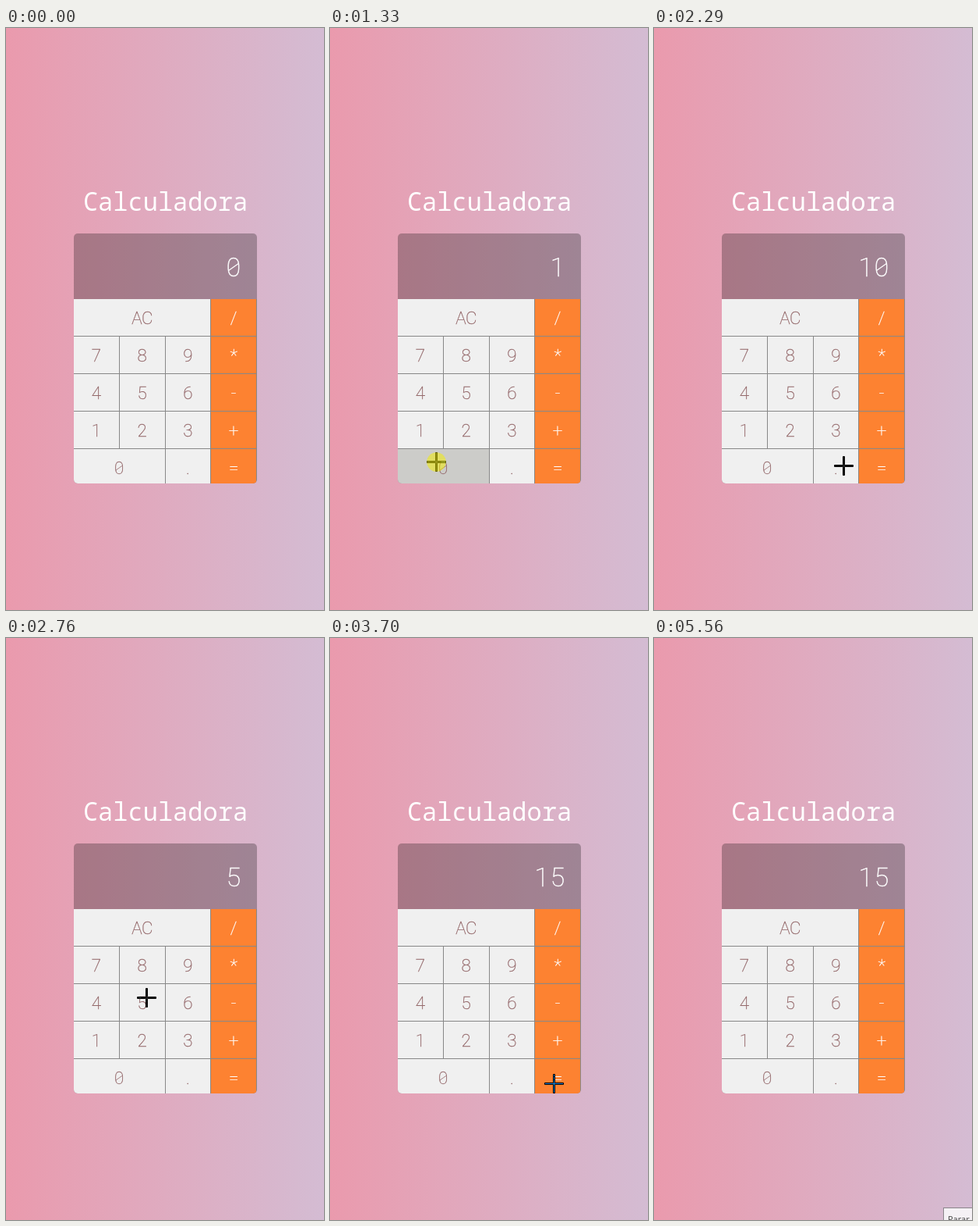
Recreate the animation shown at these times as an HTML page. Size 408 px wide and 745 px high, loop 5.64 s.

```html
<!DOCTYPE html>
<html lang="pt">
<head>
<meta charset="utf-8">
<title>Calculadora</title>
<style>
  html, body { margin: 0; width: 100%; height: 100%; overflow: hidden; }
  svg { display: block; width: 408px; height: 745px; }
  text { text-anchor: middle; }
  .title { font: 400 32px "Roboto Mono", "Noto Sans Mono", monospace; fill: #fff; }
  .glyph { font-family: Roboto, sans-serif; font-weight: 100; }
  .tip { font: 11px "Open Sans", sans-serif; fill: #444; text-anchor: start; }
  .invert { mix-blend-mode: difference; }
</style>
</head>
<body>
<svg viewBox="0 0 408 745">
  <defs>
    <linearGradient id="sky">
      <stop offset="0" stop-color="#ea9aad"/>
      <stop offset="1" stop-color="#d4bcd3"/>
    </linearGradient>
    <clipPath id="body"><rect x="87" y="263" width="235" height="320" rx="5"/></clipPath>
  </defs>
  <rect width="408" height="745" fill="url(#sky)"/>
  <text class="title" x="204.5" y="233.5">Calculadora</text>
  <g id="calculator" clip-path="url(#body)">
    <rect x="87" y="263" width="235" height="84" fill="#000" fill-opacity=".267"/>
  </g>
  <g id="display"></g>
  <path class="pointer" fill="none" stroke="#000"
        d="M-1-12H1V-1H12V1H1V12H-1V1H-12V-1H-1Z"/>
  <path class="pointer invert" fill="none" stroke="#fff" d="M0-11.5V11.5M-11.5 0H11.5"/>
  <circle id="halo" class="pointer" r="12.3" fill="#f4ee00" fill-opacity=".52"/>
  <g id="tooltip">
    <rect x="371.5" y="729.5" width="50" height="30" fill="#f5f1f5" stroke="#8a858a"/>
    <text class="tip" x="377" y="748">Parar</text>
  </g>
</svg>
<script>
const LOOP = 5640;
const BEAT = 78.6;      // the picture is refreshed once per beat
const EARLY = 20;
const COLUMN = 58.75, ROW = 48;
const KEY_ROWS = ["AC /", "7 8 9 *", "4 5 6 -", "1 2 3 +", "0 . ="];
const SPANS = { AC: 3, 0: 2 };
const CLICKS = [["1", 12], ["0", 17], ["+", 25], ["5", 34], ["=", 46]];

// Pointer strokes: beats, end point and the control point that bends them.
const ENTRY = [337, 740];
const STROKES = [
  { from: 1, until: 11, to: [118, 516], via: [175, 566] },
  { from: 13, until: 17, to: [136, 555] },
  { from: 18, until: 24, to: [289, 517], via: [212, 558] },
  { from: 26, until: 33, to: [180, 460], via: [236, 626] },
  { from: 35, until: 43, to: [287, 570], via: [276, 654] },
  { from: 48, until: 53, to: [283, 640] },
  { from: 60, until: 66, to: [362, 738], via: [300, 676] }
];
const LEAVE = 67, TIP = 70;

const byId = id => document.getElementById(id);
const display = byId("display"), halo = byId("halo"), tooltip = byId("tooltip");
const pointer = document.querySelectorAll(".pointer");
const keys = {};

function add(parent, tag, attrs) {
  const node = document.createElementNS("http://www.w3.org/2000/svg", tag);
  for (const name in attrs) node.setAttribute(name, attrs[name]);
  return parent.appendChild(node);
}

// Monospaced characters, centred on x; zeros carry a slash.
function write(parent, string, x, y, size, color) {
  [...string].forEach((char, i) => {
    const cx = x + (i - (string.length - 1) / 2) * size * 0.6;
    add(parent, "text", {
      class: "glyph", x: cx, y, fill: color, stroke: color,
      "font-size": size, "stroke-width": size * 0.015
    }).textContent = char;
    if (char === "0") add(parent, "path", {
      d: `M${cx - size * 0.19} ${y - size * 0.22}L${cx + size * 0.19} ${y - size * 0.49}`,
      stroke: color, "stroke-width": size * 0.036
    });
  });
}

function buildKeys() {
  const calculator = byId("calculator");
  KEY_ROWS.forEach((labels, row) => {
    let left = 87;
    for (const label of labels.split(" ")) {
      const right = left + (SPANS[label] || 1) * COLUMN;
      const x = Math.round(left), width = Math.round(right) - x, y = 347 + row * ROW;
      const operation = "/*-+=".includes(label);
      const color = operation ? "#fd8231" : "#f0f0f0";
      add(calculator, "rect", { x, y, width, height: ROW, fill: "#888" });
      const face = add(calculator, "rect", { x, y, width: width - 1, height: ROW - 1, fill: color });
      write(calculator, label, (left + right - 1) / 2, y + 32, 22.4, operation ? "#fff" : "#94686a");
      keys[label] = { face, color };
      left = right;
    }
  });
}

function calculate(pressed) {
  let value = "0", stored = 0, fresh = true;
  for (const key of pressed) {
    if (key === "+") {
      stored = +value;
      fresh = true;
    } else if (key === "=") {
      value = String(stored + +value);
    } else {
      value = fresh ? key : value + key;
      fresh = false;
    }
  }
  return value;
}

function pointerAt(beat) {
  let start = ENTRY;
  for (const { from, until, to, via } of STROKES) {
    if (beat < from) break;
    const k = Math.min(1, (beat - from) / (until - from));
    start = start.map((a, axis) => {
      const c = to[axis], b = via ? via[axis] : (a + c) / 2;
      return (1 - k) ** 2 * a + 2 * k * (1 - k) * b + k * k * c;
    });
  }
  return start.map(v => Math.round(v) + 0.5);
}

let shown;
function showValue(value) {
  if (value === shown) return;
  shown = value;
  display.replaceChildren();
  write(display, value, 302 - value.length * 10.08, 318, 33.6, "#fff");
}

function render(t) {
  const beat = Math.floor((t + EARLY) / BEAT);
  showValue(calculate(CLICKS.filter(([, at]) => beat > at).map(([label]) => label)));

  const held = CLICKS.find(([, at]) => beat === at);
  for (const label in keys) {
    const { face, color } = keys[label];
    face.setAttribute("fill", held && held[0] === label ? "#ccccc9" : color);
  }

  const present = beat >= 1 && beat < LEAVE;
  for (const node of pointer) {
    const visible = present && (node !== halo || held);
    node.setAttribute("visibility", visible ? "visible" : "hidden");
    node.setAttribute("transform", `translate(${pointerAt(beat)})`);
  }
  tooltip.setAttribute("opacity", Math.max(0, Math.min(1, (beat - TIP + 1) / 2)));
}

buildKeys();
const began = performance.now();
function tick() {
  render((performance.now() - began) % LOOP);
  requestAnimationFrame(tick);
}
tick();
</script>
</body>
</html>
```
